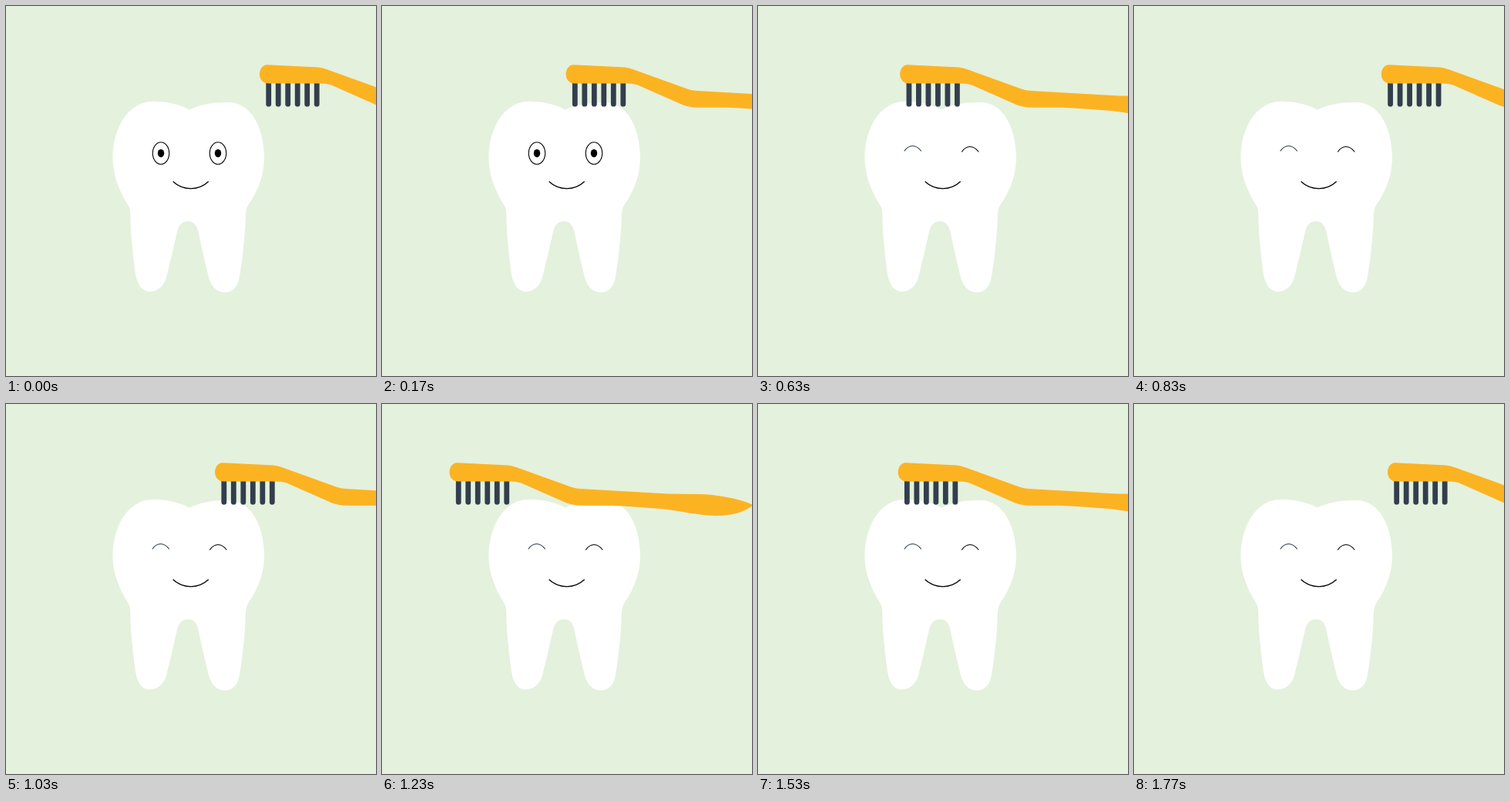
Animation, 480 px wide and 480 px high, one loop 1.81 s. Source, as an HTML page:

```html
<!DOCTYPE html>
<html lang="en">
<head>
<meta charset="utf-8">
<title>Brushing a happy tooth</title>
<style>
  html, body { margin: 0; width: 100%; height: 100%; overflow: hidden; background: #e4f1dd; }
  svg { display: block; width: 100vw; height: 100vh; }
  .line { fill: none; stroke: #000; stroke-width: 1.1; stroke-linecap: round; }
  #bristles { stroke: #333e4d; stroke-width: 6.8; stroke-linecap: round; }
</style>
</head>
<body>
<svg viewBox="0 0 480 480">
  <path fill="#fff" d="M238 134.5
    C224 127 207 123.5 190 123.8
    C158 124.5 138.5 159 138.5 197
    C138.5 219 146 238 158 258
    Q161 262 161.2 269
    C161.8 297 164.5 323 168 347
    C170 362 177 370.6 186.5 370.6
    C197 370.6 205 363 208 352
    C213 333 218 310 222 293
    C224 283.5 229 279.2 236 279.2
    C243 279.2 247.5 283.5 249.5 293
    C253.5 311 258 333 263 352
    C266 364 274 371.5 284 371.5
    C294 371.5 301 364 303 351
    C307.5 324 310.2 298 311 270
    Q311.4 262.5 314.5 258
    C327 240 335 219 335 197
    C335 158 318 126 290 125
    C271 124.3 252 127.5 238 134.5Z"/>
  <g id="open">
    <g class="line">
      <ellipse cx="201" cy="191" rx="10.7" ry="14.3"/>
      <ellipse cx="275" cy="191" rx="10.7" ry="14.3"/>
    </g>
    <ellipse cx="201" cy="191" rx="4.2" ry="5.3"/>
    <ellipse cx="275" cy="191" rx="4.2" ry="5.3"/>
  </g>
  <g id="closed" class="line">
    <path stroke="#2c3e50" d="M190 188C196 179.3 205 179.3 211.5 188"/>
    <path d="M264.5 189C270.5 180.3 279.5 180.3 286 189"/>
  </g>
  <path class="line" style="stroke-width:1.3" d="M217 228C229.5 239.7 250 239.7 262.3 228"/>
  <g id="brush">
    <g id="bristles"></g>
    <path fill="#fcb322" d="M10 76.2 L76 79.6
      Q81 80 88 82.6 L158 107.8
      Q163 109.6 170 110 L284 116.4
      L324 117
      C346 117.5 375 122 394 131
      C382 142 361 145.2 345 145
      C325 144.5 303 139.5 275 136
      Q240 133.2 210 131.7 L172 131.7
      Q160 131.8 152 128.6 L93 102.6
      Q87 100.5 80 100.5 L12 100.5
      C4 100.5 0 95 0 88.4
      C0 82 4 76 10 76.2Z"/>
  </g>
</svg>
<script>
const LOOP = 1810, LAST = 53, BLINK = 13;
const el = id => document.getElementById(id);

el("bristles").innerHTML = Array.from({ length: 6 }, (_, i) => {
  const x = 11.7 + i * 12.5;
  return `<line x1="${x}" x2="${x}" y1="97" y2="127.2"/>`;
}).join("");

// Strokes of the brush: [first step, last step, from x, to x], 30 steps a second
const strokes = [
  [0, 12.4, 329, 71],
  [12.5, 26.6, 71, 329],
  [27.3, 39.2, 329, 66],
  [40, 53, 66, 329]
];

const ease = p => (1 - Math.cos(Math.PI * p)) / 2;

function brushX(step) {
  const [a, b, from, to] = strokes.findLast(s => step >= s[0]);
  return from + (to - from) * ease(Math.min((step - a) / (b - a), 1));
}

function draw(now) {
  const ticks = Math.floor((now % LOOP) / 10);
  const step = Math.min(LAST, Math.floor((ticks + 0.4) * 0.3));
  const happy = step >= BLINK;
  el("brush").setAttribute("transform", `translate(${brushX(step).toFixed(2)} 0)`);
  el("open").style.display = happy ? "none" : "";
  el("closed").style.display = happy ? "" : "none";
}

const start = performance.now();
function loop() {
  draw(performance.now() - start);
  requestAnimationFrame(loop);
}
loop();
</script>
</body>
</html>
```
